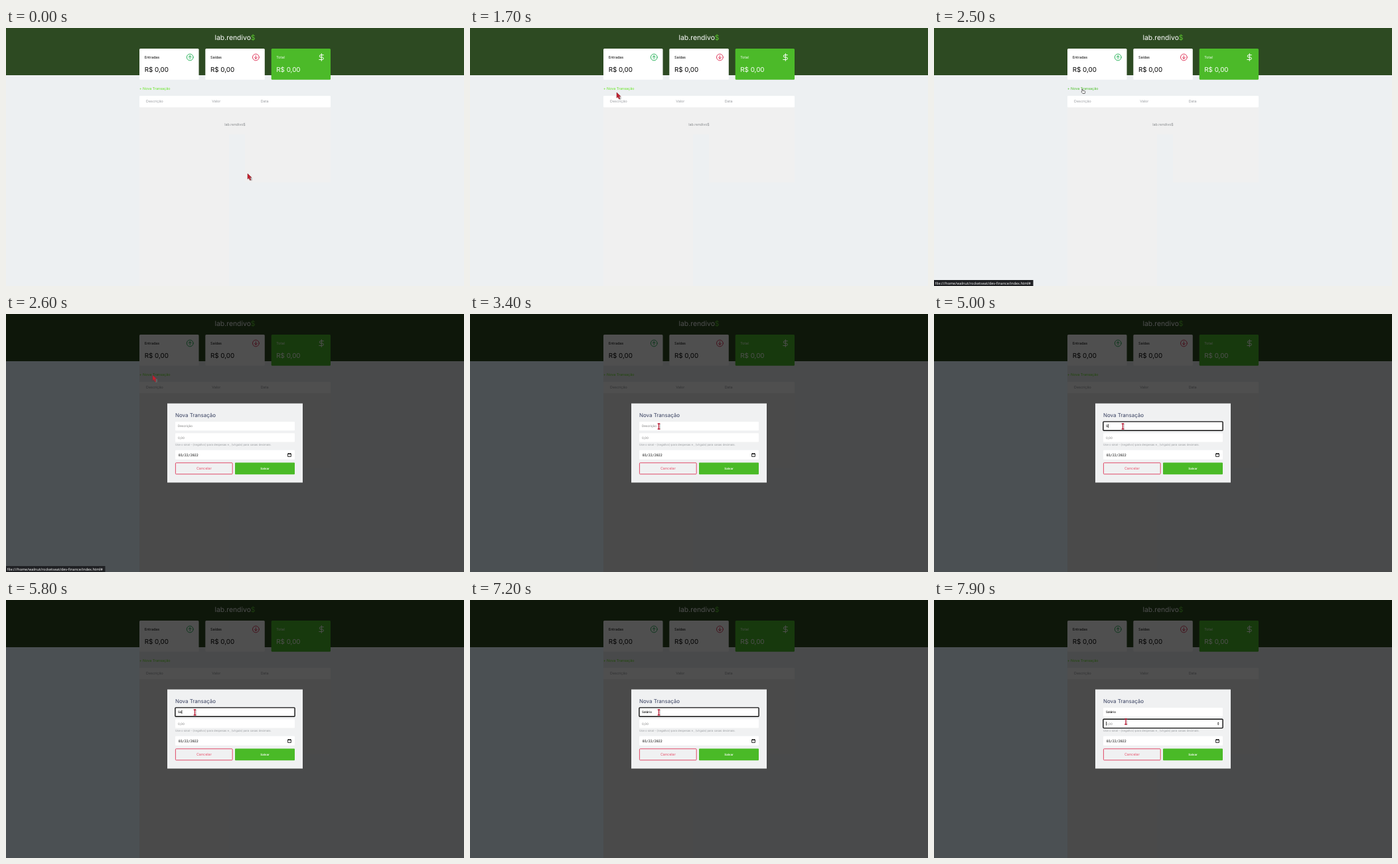
An HTML page for the animation above (8 s loop, 690 by 388 pixels).

```html
<!DOCTYPE html>
<html lang="pt-BR">
<head>
<meta charset="utf-8">
<title>Nova Transação</title>
<style>
  html, body { margin: 0; width: 100%; height: 100%; overflow: hidden; background: #edf0f2; }
  svg { display: block; width: 690px; height: 388px; text-rendering: geometricPrecision; }
  text { font-family: Inter, sans-serif; font-size: 5.4px; }
  .amount { font-size: 9.8px; }
  .muted { fill: #989b9f; }
  .small { font-size: 4.6px; }
  .mid { text-anchor: middle; }
  .line { fill: none; stroke-width: 1; stroke-linecap: round; stroke-linejoin: round; }
  .ring { fill: none; stroke: #101010; stroke-width: 1.4; }
  #link { fill: #62e51f; }
  #link.hover { fill: #45bd20; }
</style>
</head>
<body>
<svg viewBox="0 0 690 388">
  <rect width="690" height="388" fill="#edf0f2"/>
  <path d="M201 119H489V232H360V160H336V388H201Z" fill="#f0f0f0"/>
  <rect width="690" height="71" fill="#2d4a22"/>
  <text class="mid" x="345" y="17.8" fill="#fff" style="font-size:10.4px">lab.rendivo<tspan fill="#5cc92f">$</tspan></text>

  <g fill="#fff">
    <rect x="201" y="31" width="89.5" height="46.7" rx="1.5"/>
    <rect x="300.3" y="31" width="89.5" height="46.7" rx="1.5"/>
    <rect x="399.7" y="31" width="89.3" height="46.7" rx="1.5" fill="#4cba29"/>
    <rect x="201" y="102" width="288" height="17.3" rx="1"/>
  </g>
  <text x="208.7" y="46">Entradas</text>
  <text x="308" y="46">Saídas</text>
  <text x="407.3" y="46" fill="#fff">Total</text>
  <text class="amount" x="208.7" y="65.8">R$ 0,00</text>
  <text class="amount" x="308" y="65.8">R$ 0,00</text>
  <text class="amount" x="407.3" y="65.8" fill="#fff">R$ 0,00</text>
  <g class="line">
    <g stroke="#2fb55f"><circle cx="277.2" cy="44" r="4.9"/><path d="M277.2 46.3V41.7M275.2 43.7L277.2 41.7L279.2 43.7"/></g>
    <g stroke="#e0395c"><circle cx="376.4" cy="44" r="4.9"/><path d="M376.4 41.7V46.3M374.4 44.3L376.4 46.3L378.4 44.3"/></g>
    <path stroke="#fff" d="M475.3 38.5V49.5M478.3 40.6H474A1.7 1.7 0 0 0 474 44H476.6A1.75 1.75 0 0 1 476.6 47.5H471.8"/>
  </g>
  <text id="link" x="201" y="93.3">+ Nova Transação</text>
  <g class="muted">
    <text class="muted" x="211" y="112.4">Descrição</text>
    <text class="muted" x="310.3" y="112.4">Valor</text>
    <text class="muted" x="383.7" y="112.4">Data</text>
  </g>
  <text class="mid" x="345" y="147.4" fill="#85888b">lab.rendivo$</text>

  <g id="modal">
    <rect width="690" height="388" opacity=".69"/>
    <rect y="71" width="201" height="317" fill="#4b5053"/>
    <rect x="243" y="134.5" width="204" height="119" fill="#f0f1f2"/>
    <text x="255" y="155" fill="#363f5f" style="font-size:7.95px">Nova Transação</text>
    <g fill="#fff">
      <rect x="255" y="162" width="180" height="13.3" rx="1"/>
      <rect x="255" y="179.3" width="180" height="13.3" rx="1"/>
      <rect x="255" y="204.8" width="180" height="14" rx="1"/>
    </g>
    <text id="hint" class="small" x="259" y="170.2" fill="#777">Descrição</text>
    <text id="typed" class="small" x="259" y="170.2" font-weight="500"></text>
    <text class="small" x="259" y="187.6" fill="#777">0,00</text>
    <text x="255" y="198" fill="#999c9f" style="font-size:4.25px">Use o sinal - (negativo) para despesas e , (vírgula) para casas decimais.</text>
    <text x="259.7" y="213.6" style="font:5px 'DejaVu Sans Mono',monospace">03/22/2022</text>
    <path d="M424.6 210H429.4V214.4H424.6ZM424.4 210.5H429.6M425.7 209V210M428.3 209V210" fill="none" stroke="#111" stroke-width=".9"/>
    <rect x="255.4" y="223.8" width="85.8" height="17" rx="1" fill="none" stroke="#e04a68" stroke-width="1"/>
    <text class="mid" x="298.3" y="234.1" fill="#e8516c">Cancelar</text>
    <rect x="345" y="223.4" width="90" height="17.8" rx="1" fill="#4aba27"/>
    <text class="mid" x="390" y="233.9" fill="#fff" font-weight="600" style="font-size:4.4px">Salvar</text>
    <rect id="ringText" class="ring" x="254.9" y="161.9" width="180.2" height="13.4" rx="1"/>
    <rect id="ringValue" class="ring" x="254.9" y="179.2" width="180.2" height="13.4" rx="1"/>
    <path id="spinner" d="M426.8 185.4L428.2 183.6L429.6 185.4ZM426.8 186.4L428.2 188.2L429.6 186.4Z" fill="#333"/>
    <g id="suggest">
      <rect x="255" y="175.8" width="69" height="18.4" fill="#1c2127"/>
      <text x="259.7" y="186.8" fill="#fff" style="font:bold 5.7px 'Noto Sans',sans-serif">comida</text>
    </g>
    <rect id="caret" width=".7" height="5.8"/>
  </g>

  <g id="status">
    <rect y="379" width="149.5" height="9" fill="#202124"/>
    <text x="1.8" y="385.5" fill="#f2f2f2" style="font:5.5px 'Noto Sans',sans-serif">file:///home/walnut/rocketseat/dev-finance/index.html#</text>
  </g>

  <g id="pointer">
    <g id="arrow">
      <path d="M2 2L7 6.2V10.5L4 11Z" fill="#888" opacity=".4"/>
      <path d="M0 0V8.2L1.9 6.7L3.4 10L5 9.2L3.5 6.1L5.9 5.8Z" fill="#c5202f" stroke="#7d2930" stroke-width=".5"/>
    </g>
    <path id="hand" d="M1 4V.7Q1.6 -.1 2.2 .7V2.7L5.2 3.3Q6 3.6 5.9 4.6L5.2 7H2L-.1 4.6Q.1 3.5 1 4Z" fill="#fff" stroke="#333" stroke-width=".7"/>
    <g id="beam" class="line">
      <path d="M2 -3.6V4.4" stroke="#999" opacity=".5"/>
      <path d="M-1.8 -4H1.8M0 -4V4M-1.8 4H1.8" stroke="#b51731" stroke-width="1.3" stroke-linecap="butt"/>
    </g>
  </g>
</svg>
<script>
const LOOP = 8000, STEP = 100;
const WORD = 'Salário';
const keyTimes = [4900, 5100, 6000, 6100, 6300, 6500, 6600];
// time, x, y of the pointer's hot spot
const path = [
  [1100, 364, 219], [1700, 221, 97], [1900, 221, 95], [2000, 221, 95],
  [2100, 222, 91.5], [2500, 222, 91.5], [2600, 221, 92], [2700, 221, 92],
  [3400, 284.5, 169], [7300, 284.5, 169], [7800, 289, 183]
];
const el = id => document.getElementById(id);
const within = (t, from, to = LOOP) => t >= from && t < to;
const show = (id, on) => el(id).setAttribute('visibility', on ? 'inherit' : 'hidden');
const ease = p => p * p * (3 - 2 * p);

function pointerAt(t) {
  const next = path.findIndex(key => key[0] > t);
  if (next === 0) return path[0].slice(1);
  if (next < 0) return path[path.length - 1].slice(1);
  const [t0, x0, y0] = path[next - 1], [t1, x1, y1] = path[next];
  const p = ease((t - t0) / (t1 - t0));
  return [x0 + (x1 - x0) * p, y0 + (y1 - y0) * p];
}

function draw(t) {
  const [x, y] = pointerAt(t);
  el('pointer').setAttribute('transform', `translate(${x} ${y})`);
  const hand = within(t, 2100, 2600), beam = t >= 3400;
  show('hand', hand);
  show('beam', beam);
  show('arrow', !hand && !beam);
  el('link').classList.toggle('hover', hand);

  show('status', within(t, 2500, 2800));
  el('modal').setAttribute('visibility', t >= 2600 ? 'visible' : 'hidden');
  show('ringText', within(t, 3900, 7700));
  show('ringValue', t >= 7700);
  show('spinner', t >= 7600);
  show('suggest', within(t, 4000, 5000));

  const text = WORD.slice(0, keyTimes.filter(k => k <= t).length);
  const typed = el('typed');
  typed.textContent = text;
  show('hint', !text);

  const onValue = t >= 7700;
  const width = text && !onValue ? typed.getComputedTextLength() : 0;
  el('caret').setAttribute('x', 259 + width);
  el('caret').setAttribute('y', onValue ? 182.9 : 165.4);
  show('caret', within(t, 4000, 4700) || within(t, 4900, 5200) || within(t, 5800, 7200) || onValue);
}

function tick() {
  const t = performance.now() % LOOP;
  draw(Math.floor(t / STEP) * STEP);
  requestAnimationFrame(tick);
}
tick();
</script>
</body>
</html>
```
